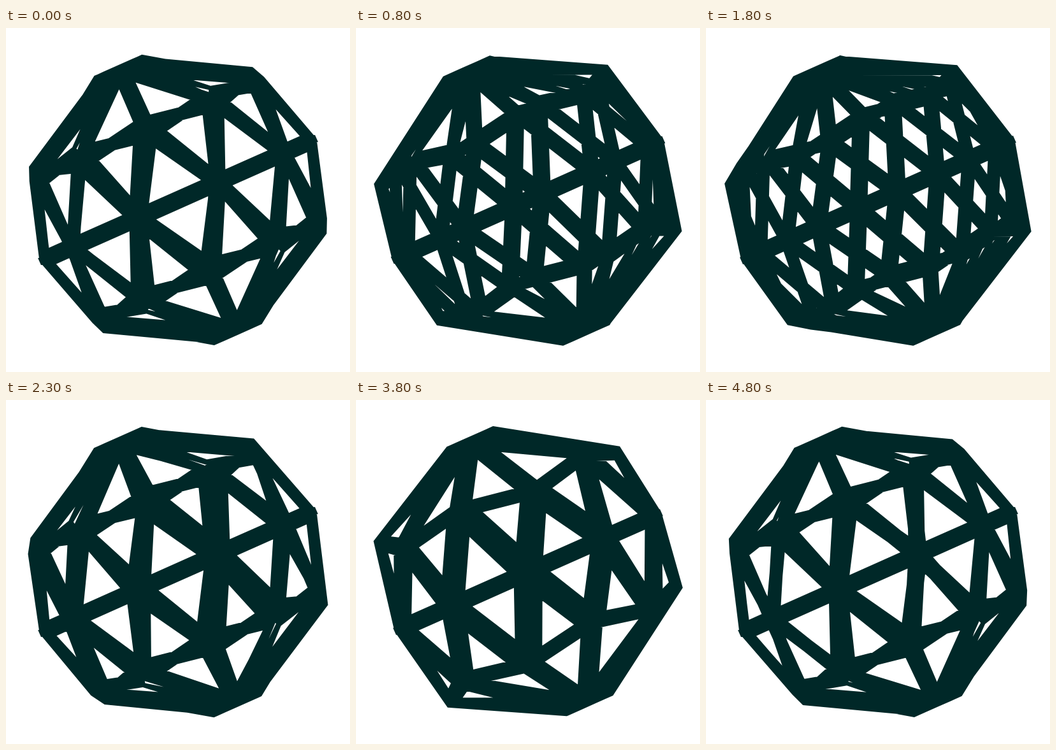
Recreate the animation shown at these times as an HTML page with a canvas. Size 540 px wide and 540 px high, loop 4900 ms.

```html
<!DOCTYPE html>
<html lang="en">
<head>
<meta charset="utf-8">
<title>Turning dome</title>
<style>
  html, body { margin: 0; width: 100%; height: 100%; overflow: hidden; background: #fff; }
  canvas { display: block; width: 540px; height: 540px; }
</style>
</head>
<body>
<canvas id="stage" width="540" height="540"></canvas>
<script>
const ctx = document.getElementById('stage').getContext('2d');
const RAD = Math.PI / 180;
const TILT = 24 * RAD, CENTER = 270;
const HALF_WIDTH = 14, INNER = 0.945, BAND = 6;
const FRAME_MS = 100, FRAMES = 49, FIRST = -0.3 * RAD, STEP = 1.495 * RAD;

// Cylindrical coordinates around the spin axis.
const point = (r, h, deg) => [r * Math.sin(deg * RAD), h, r * Math.cos(deg * RAD)];
const mix = (a, b, t) => a.map((v, i) => v + (b[i] - v) * t);
const scale = (p, s) => p.map(v => v * s);
const dist = (a, b) => Math.hypot(a[0] - b[0], a[1] - b[1], a[2] - b[2]);

// Triangle moved inwards by the same width on every side.
function insetTriangle([a, b, c], width) {
  const la = dist(b, c), lb = dist(c, a), lc = dist(a, b);
  const sum = la + lb + lc, s = sum / 2;
  const inRadius = Math.sqrt((s - la) * (s - lb) * (s - lc) / s);
  const center = a.map((_, i) => (la * a[i] + lb * b[i] + lc * c[i]) / sum);
  return [a, b, c].map(p => mix(center, p, 1 - width / inRadius));
}

const polys = [];

// Struts have a flat inner base and slope up to a ridge on the outer shell.
function addFace(tri, rim) {
  const hole = insetTriangle(tri.map(p => scale(p, INNER)), HALF_WIDTH);
  for (const s of [1, INNER]) {
    for (const [p, q, i, j] of rim) polys.push([scale(p, s), scale(q, s), hole[j], hole[i]]);
  }
}

function addTriangle(a, b, c) {
  addFace([a, b, c], [[a, b, 0, 1], [b, c, 1, 2], [c, a, 2, 0]]);
}

const isEven = k => k % 2 === 0;
const equator = (k, h = 0) => point(238, h, 36 * k + 18);

for (const side of [1, -1]) {
  const pole = [0, 231.5 * side, 0];
  const hub = k => point(isEven(k) ? 36.5 : 43, 231.5 * side, 36 * k);
  const ring = k => isEven(k) ? point(202, 143 * side, 36 * k) : point(212, 121.5 * side, 36 * k);
  const cap = [];
  for (let k = 0; k < 10; k++) {
    const a = ring(k), b = ring(k + 1), ha = hub(k), hb = hub(k + 1);
    addFace([pole, a, b], [[ha, a, 0, 1], [a, b, 1, 2], [b, hb, 2, 0], [hb, ha, 0, 0]]);
    addTriangle(a, b, equator(k));
    addTriangle(equator(k - 1), equator(k), a);
    cap.push(ha);
  }
  polys.push(cap);
}

for (let k = 0; k < 10; k++) {
  polys.push([equator(k, BAND), equator(k + 1, BAND), equator(k + 1, -BAND), equator(k, -BAND)]);
}

const sinT = Math.sin(TILT), cosT = Math.cos(TILT);

function draw(angle) {
  const c = Math.cos(angle), s = Math.sin(angle);
  const project = ([x, h, z]) => {
    const v = x * c + z * s;
    return [CENTER - sinT * h + cosT * v, CENTER - cosT * h - sinT * v];
  };
  ctx.fillStyle = '#fff';
  ctx.fillRect(0, 0, 540, 540);
  ctx.fillStyle = '#002828';
  ctx.beginPath();
  for (const poly of polys) {
    const pts = poly.map(project);
    const area = pts.reduce((sum, p, i) => {
      const q = pts[(i + 1) % pts.length];
      return sum + p[0] * q[1] - q[0] * p[1];
    }, 0);
    // Same winding everywhere, so one fill gives the union.
    if (area < 0) pts.reverse();
    pts.forEach(([x, y], i) => i ? ctx.lineTo(x, y) : ctx.moveTo(x, y));
    ctx.closePath();
  }
  ctx.fill('nonzero');
}

const start = performance.now();
let shown = -1;

function tick() {
  const frame = Math.floor((performance.now() - start) / FRAME_MS) % FRAMES;
  if (frame !== shown) draw(FIRST + frame * STEP);
  shown = frame;
  requestAnimationFrame(tick);
}
tick();
</script>
</body>
</html>
```
